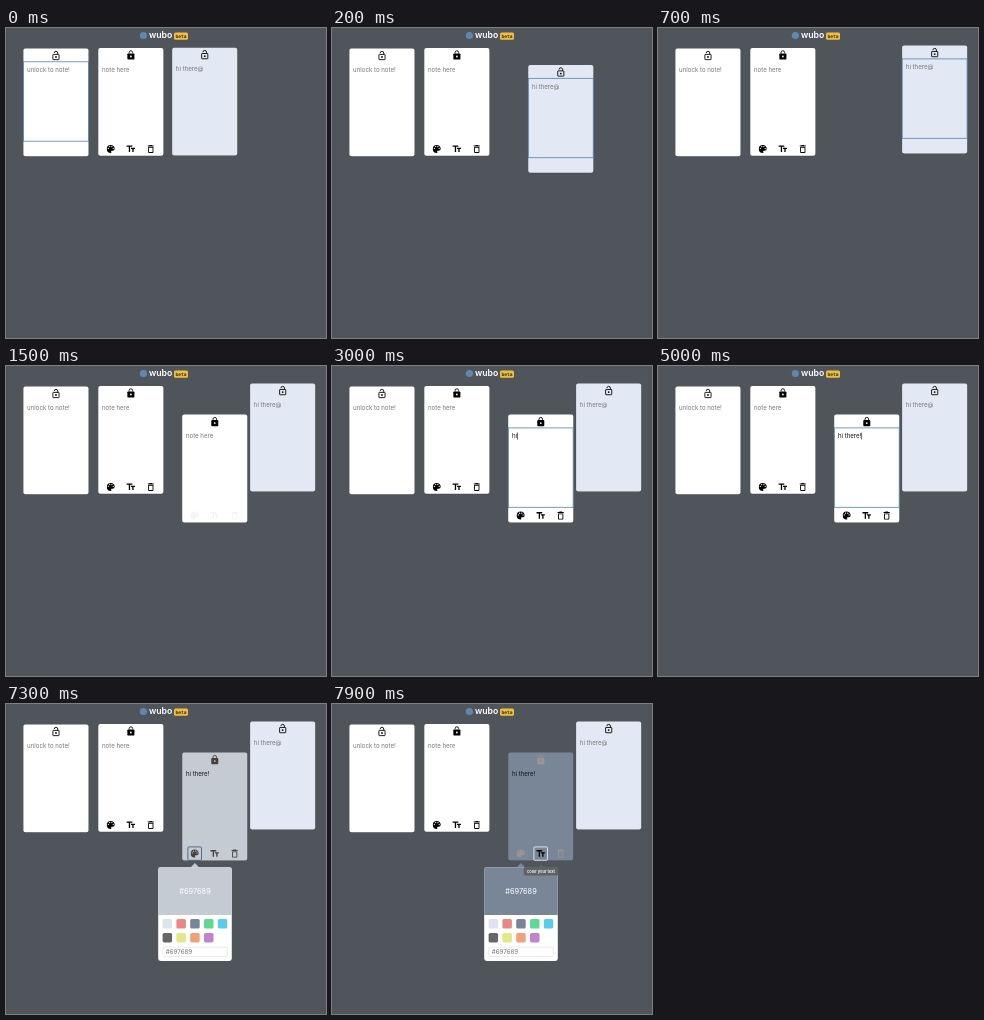
Animation, 320 px wide and 310 px high, one loop 8 s. Source, as an HTML page:

```html
<!DOCTYPE html>
<html lang="en">
<head>
<meta charset="utf-8">
<title>Sticky notes</title>
<style>
  html, body { margin: 0; width: 100%; height: 100%; overflow: hidden; background: #50545b; }
  svg { display: block; width: 320px; height: 310px; }
  text { font-family: Inter, "Open Sans", sans-serif; }
  .body { font-size: 6.1px; }
</style>
</head>
<body>
<svg id="stage" viewBox="0 0 320 310" xmlns="http://www.w3.org/2000/svg">
  <defs>
    <g id="lock">
      <rect x="4" y="8" width="16" height="14" rx="2" fill="currentColor"/>
      <path d="M8 8V6a4 4 0 0 1 8 0v2" fill="none" stroke="currentColor" stroke-width="2"/>
      <circle cx="12" cy="15" r="2" fill="var(--paper)"/>
    </g>
    <g id="unlock" fill="none" stroke="currentColor" stroke-width="2">
      <rect x="5" y="9" width="14" height="12" rx="1"/>
      <path d="M8 6a4 4 0 0 1 8 0v3"/>
      <circle cx="12" cy="15" r="2" fill="currentColor" stroke="none"/>
    </g>
    <g id="palette">
      <path fill="currentColor" d="M12 3a9 9 0 0 0 0 18c.8 0 1.5-.7 1.5-1.5 0-1-.8-1-.8-2 0-.8.7-1.5 1.5-1.5H16a5 5 0 0 0 5-5c0-4.4-4-8-9-8z"/>
      <g fill="var(--paper)">
        <circle cx="6.5" cy="10.5" r="1.5"/><circle cx="9.5" cy="6.5" r="1.5"/>
        <circle cx="14.5" cy="6.5" r="1.5"/><circle cx="17.5" cy="10.5" r="1.5"/>
      </g>
    </g>
    <path id="type" fill="currentColor" d="M2.5 4v3h5v12h3V7h5V4zM21.5 9h-9v3h3v7h3v-7h3z"/>
    <path id="trash" fill="currentColor" fill-rule="evenodd" d="M6 19a2 2 0 0 0 2 2h8a2 2 0 0 0 2-2V7H6zM8 9h8v10H8zM15.5 4l-1-1h-5l-1 1H5v2h14V4z"/>
  </defs>
  <rect width="320" height="310" fill="#50545b"/>
  <circle cx="137.4" cy="7.5" r="3.6" fill="#5f88b0"/>
  <text x="143" y="10.2" font-size="8.7" font-weight="600" fill="#fff">wubo</text>
  <rect x="168" y="4.5" width="14" height="7.3" rx="1.5" fill="#f1bf3c"/>
  <text x="169.5" y="9.9" font-size="4.6" font-weight="700" fill="#33302a" style="font-family:'DejaVu Sans Mono',monospace">beta</text>
</svg>
<script>
const LOOP = 8000;
const SLATE = [121, 134, 152];
const WHITE = [255, 255, 255];
const SWATCHES = ['#dbe4ef', '#ea8784', '#798698', '#60d792', '#5bcce8',
                  '#666666', '#e3e886', '#f2a077', '#c083ce'];
const stage = document.getElementById('stage');

function add(parent, tag, attrs = {}, text = '') {
  const node = document.createElementNS(stage.namespaceURI, tag);
  set(node, attrs);
  node.textContent = text;
  return parent.appendChild(node);
}
function set(node, attrs) {
  for (const key in attrs) node.setAttribute(key, attrs[key]);
}
const group = (parent, x = 0, y = 0) => add(parent, 'g', { transform: `translate(${x} ${y})` });
const show = (node, amount) => node.setAttribute('opacity', Number(amount));
const ramp = (t, from, to) => Math.min(1, Math.max(0, (t - from) / (to - from)));
const mix = (a, b, k) => `rgb(${a.map((v, i) => Math.round(v + (b[i] - v) * k))})`;

// Interpolates [time, ...values] stops.
function track(stops, t) {
  const next = stops.findIndex(s => s[0] > t);
  if (next === 0) return stops[0].slice(1);
  if (next < 0) return stops[stops.length - 1].slice(1);
  const a = stops[next - 1], b = stops[next], k = ramp(t, a[0], b[0]);
  return a.slice(1).map((v, i) => v + (b[i + 1] - v) * k);
}
// Picks the value of the latest [time, value] step.
const step = (steps, t) => steps.filter(s => s[0] <= t).pop()[1];

function icon(parent, name, x, y) {
  return add(parent, 'use', { href: '#' + name, transform: `translate(${x - 5.3} ${y - 5.3}) scale(.44)` });
}

function makeCard(x, y, lockName, label, { paper = '#fff', tools = false } = {}) {
  const root = group(stage, x, y);
  root.style.cssText = `--paper:${paper};color:#000`;
  add(root, 'rect', { x: -.2, y: .3, width: 65.5, height: 108, rx: 2.2, fill: '#000', opacity: .18 });
  add(root, 'rect', { width: 65.1, height: 107.8, rx: 2, fill: 'var(--paper)' });
  const lock = icon(root, lockName, 32.6, 7.2);
  const text = add(root, 'text', { x: 3.7, y: 23.8, class: 'body', fill: '#777' }, label);
  const ring = add(root, 'rect', { x: .1, y: 13.3, width: 64.9, height: 79.4, fill: 'none', stroke: '#5482ad', 'stroke-width': .8, opacity: 0 });
  const bar = group(root);
  const parts = tools ? ['palette', 'type', 'trash'].map((n, i) => icon(bar, n, 12.5 + i * 20, 101)) : [];
  return { root, lock, text, ring, bar, parts };
}

const first = makeCard(17.4, 20.5, 'unlock', 'unlock to note!');
makeCard(92.3, 20, 'lock', 'note here', { tools: true });
const blue = makeCard(166.1, 19.6, 'unlock', 'hi there@', { paper: '#e2e8f4' });
const fresh = makeCard(176.2, 48.6, 'lock', 'note here', { tools: true });
const caret = add(fresh.root, 'rect', { y: 18, width: .6, height: 7, fill: '#111' });
const focus = add(fresh.root, 'rect', { y: 94.3, width: 13.6, height: 13.4, rx: 1, fill: 'none', 'stroke-width': .9 });

// Color picker below the new card
const picker = group(stage);
const arrow = add(picker, 'path', { d: 'M184.6 163.5l4.3-4.6 4.3 4.6z' });
add(picker, 'rect', { x: 152.2, y: 163.3, width: 73.6, height: 93.7, rx: 2.4, fill: '#fff' });
const head = add(picker, 'path', { d: 'M152.2 211v-45.3q0-2.4 2.4-2.4h68.8q2.4 0 2.4 2.4V211z' });
const headText = add(picker, 'text', { x: 189, y: 190, 'font-size': 7.4, 'text-anchor': 'middle' });
SWATCHES.forEach((fill, i) => add(picker, 'rect', {
  x: 156.6 + i % 5 * 13.8, y: 215 + Math.floor(i / 5) * 13.9, width: 9.5, height: 9.5, rx: 1.6, fill
}));
add(picker, 'rect', { x: 156.8, y: 243.2, width: 64.4, height: 9.2, rx: .8, fill: '#fff', stroke: '#dcdcdc', 'stroke-width': .6 });
const field = add(picker, 'text', { x: 159.8, y: 250, 'font-size': 6.2, fill: '#757575' });

function makeTip(center, width, label, fill) {
  const tip = group(stage, center, 163);
  add(tip, 'rect', { x: -width / 2, width, height: 8.6, rx: 1.4, fill });
  add(tip, 'path', { d: 'M-2.5 .1L0-2.5 2.5 .1z', fill });
  add(tip, 'text', { y: 5.7, 'font-size': 4, 'font-weight': 600, 'text-anchor': 'middle', fill: '#fff' }, label);
  return tip;
}
const colorTip = makeTip(189, 38.5, 'color this note', '#797b7f');
const textTip = makeTip(209, 34.5, 'color your text', '#606266');

const DRAG = [[0, 166.1, 19.6], [100, 172, 24], [200, 196, 37], [300, 219, 38.5], [400, 235.3, 28.2],
              [500, 243, 21], [600, 245.5, 17.2], [700, 244.1, 17.6]];
const TYPED = [[0, ''], [3000, 'hi'], [3200, 'hi '], [3600, 'hi h'], [3900, 'hi '], [4100, 'hi t'],
               [4300, 'hi th'], [4500, 'hi the'], [4700, 'hi ther'], [4800, 'hi there'], [5000, 'hi there!']];
const CARET = [[0, 0], [2100, 1], [2600, 0], [3000, 1], [5500, 0]];
const BAR = [[1400, 0], [1500, .04], [1600, .5], [1700, 1]];

function render(t) {
  show(first.ring, t < 100);
  const [x, y] = track(DRAG, t);
  set(blue.root, { transform: `translate(${x} ${y})` });
  show(blue.ring, t >= 100 && t < 1400);

  show(fresh.root, t >= 1400);
  show(fresh.bar, track(BAR, t)[0]);
  show(fresh.ring, t >= 2100 && t < 6100);
  const typed = step(TYPED, t);
  fresh.text.textContent = typed || 'note here';
  fresh.text.style.whiteSpace = 'pre';
  set(fresh.text, { fill: typed ? '#111' : '#777' });
  set(caret, { x: 3.8 + (typed ? fresh.text.getComputedTextLength() : 0) });
  show(caret, step(CARET, t));

  // Recoloring of the card and picker
  const tint = ramp(t, 7150, 7500);
  const paper = mix(WHITE, SLATE, tint);
  const faded = mix([0, 0, 0], [158, 150, 142], tint);
  const onText = t >= 7700;
  fresh.root.style.setProperty('--paper', paper);
  fresh.lock.style.color = faded;
  fresh.parts.forEach((part, i) => { part.style.color = i === 1 && onText ? '#000' : faded; });
  set(focus, { x: onText ? 25.7 : 5.7, stroke: onText ? '#e6eaf0' : '#48627c' });
  show(focus, t >= 6100);

  const code = t < 7200 ? '#ffffff' : '#697689';
  show(picker, ramp(t, 6050, 6200));
  set(arrow, { fill: paper });
  set(head, { fill: paper });
  set(headText, { fill: mix([30, 30, 30], WHITE, Number(t >= 7200)) });
  headText.textContent = code;
  field.textContent = code.toUpperCase();
  show(colorTip, ramp(t, 6050, 6200) * (1 - ramp(t, 6600, 6800)));
  show(textTip, ramp(t, 7650, 7900));
}

const start = performance.now();
function frame() {
  render((performance.now() - start) % LOOP);
  requestAnimationFrame(frame);
}
frame();
</script>
</body>
</html>
```
